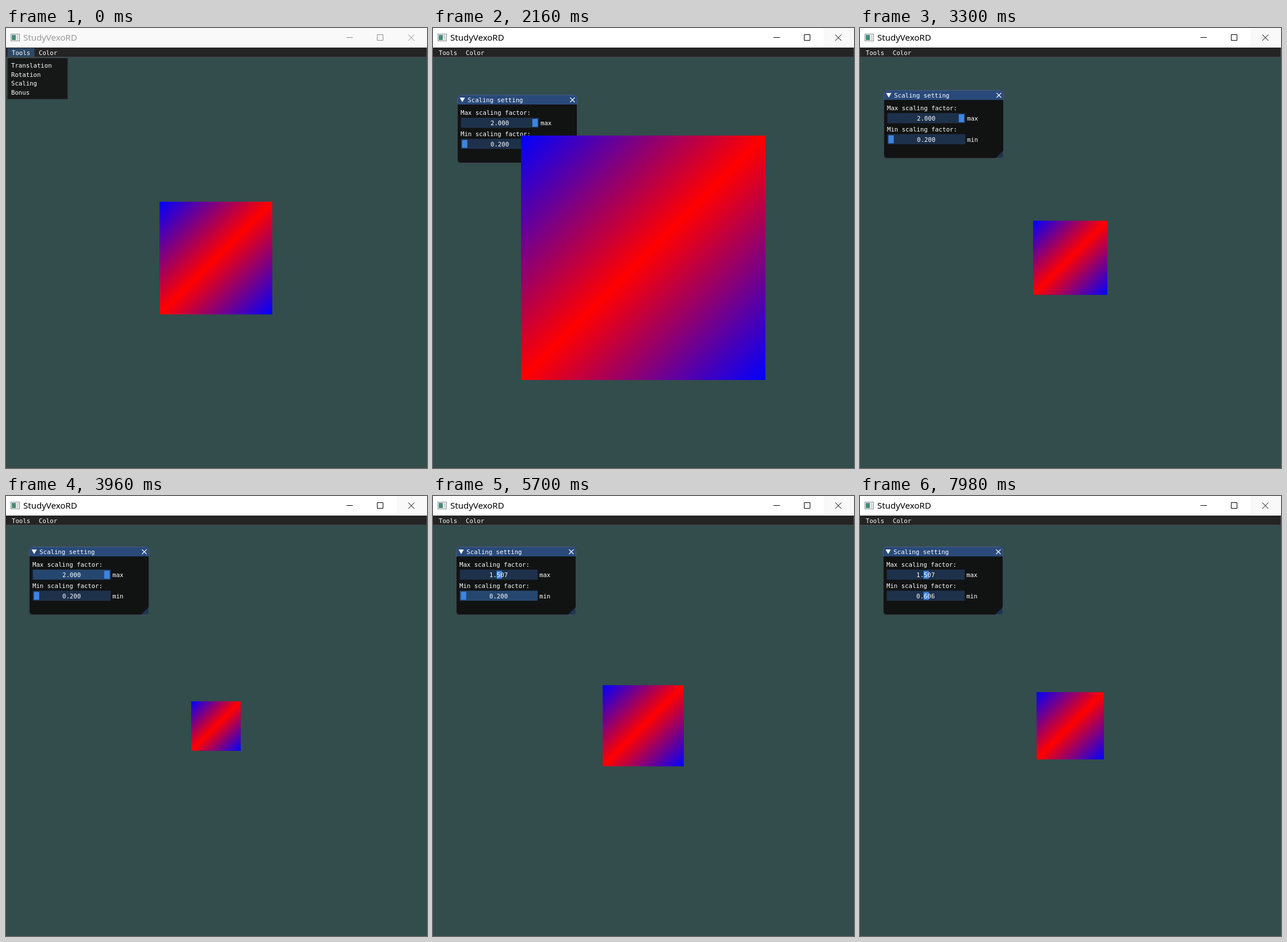
Animation, 732 px wide and 765 px high, one loop 8000 ms. Source, as an HTML page:

```html
<!DOCTYPE html>
<html lang="en">
<head>
<meta charset="utf-8">
<title>Scaling demo</title>
<style>
  html, body { margin: 0; width: 100%; height: 100%; overflow: hidden; background: #334c4c; }
  svg { display: block; width: 732px; height: 765px; }
  text { font: 10.67px "DejaVu Sans Mono", "Liberation Mono", monospace; fill: #fff; white-space: pre; }
  #caption { font: 15px "Noto Sans", "Open Sans", sans-serif; }
  .crisp { shape-rendering: crispEdges; }
  .edge { fill: none; stroke: #6e6e80; stroke-opacity: .5; }
</style>
</head>
<body>
<svg viewBox="0 0 732 765">
  <defs>
    <linearGradient id="blend" x1="0" y1="0" x2="1" y2="1">
      <stop offset="0" stop-color="#00f"/>
      <stop offset=".5" stop-color="#f00"/>
      <stop offset="1" stop-color="#00f"/>
    </linearGradient>
    <linearGradient id="pane" x1="0" y1="0" x2="1" y2="1">
      <stop offset="0" stop-color="#4a8a96"/>
      <stop offset="1" stop-color="#3f8a5c"/>
    </linearGradient>
    <clipPath id="rounded"><rect width="209" height="119" rx="6"/></clipPath>
  </defs>

  <rect width="732" height="765" fill="#334c4c"/>

  <!-- title bar -->
  <rect id="bar" width="732" height="34"/>
  <rect id="closeBg" x="679" width="53" height="33"/>
  <g class="crisp">
    <rect x="8" y="10" width="16" height="13" fill="#8a8f94"/>
    <rect x="9" y="11" width="14" height="11" fill="#f4f6f6"/>
    <rect x="10" y="12" width="7" height="9" fill="url(#pane)"/>
    <rect x="18" y="12" width="4" height="9" fill="#d5dadc"/>
  </g>
  <text id="caption" x="30" y="22">StudyVexoRD</text>
  <g id="controls" fill="none">
    <path d="M592 16.5H603M645.5 11.5h10v10h-10z"/>
    <path id="closeX" d="M699.5 11.5l10.5 10.5M710 11.5l-10.5 10.5"/>
  </g>

  <!-- menu bar -->
  <rect y="34" width="732" height="17" fill="#242424"/>
  <path class="edge" d="M0 50.5H731.5V34"/>
  <rect id="toolsBg" x="2.5" y="35" width="47" height="15" fill="#2d4766"/>
  <text x="10" y="47">Tools</text>
  <text x="57" y="47">Color</text>

  <g id="menu">
    <rect x="2.5" y="52" width="105" height="72" fill="#161817"/>
    <rect class="edge" x="3" y="52.5" width="104" height="71" style="stroke-opacity:.2"/>
    <rect id="itemBg" x="6" y="89" width="98" height="15" fill="#397dcd"/>
    <text x="9" y="69">Translation</text>
    <text x="9" y="84.5">Rotation</text>
    <text x="9" y="100">Scaling</text>
    <text x="9" y="115.5">Bonus</text>
  </g>

  <!-- settings panel, drawn from its own top left corner -->
  <g id="panel">
    <g clip-path="url(#rounded)">
      <rect width="209" height="119" fill="#111313"/>
      <rect width="209" height="17" fill="#294a7a"/>
      <path d="M209 104.5V119H194z" fill="#1e344e"/>
    </g>
    <rect class="edge" x=".5" y=".5" width="208" height="118" rx="6"/>
    <path d="M4.5 5h9l-4.5 8z" fill="#fff"/>
    <path d="M196.5 5l8 8M204.500 5l-8 8" stroke="#fff" stroke-width="1.1"/>
    <text x="18.300" y="13">Scaling setting</text>
    <text x="6" y="35">Max scaling factor:</text>
    <text x="6" y="71.500">Min scaling factor:</text>
    <g id="maxRow" transform="translate(6.500 40)"></g>
    <g id="minRow" transform="translate(6.500 76.600)"></g>
  </g>

  <rect id="square" class="crisp" fill="url(#blend)"/>
</svg>

<script>
const LOOP = 8000, STEP = 60;
const $ = id => document.getElementById(id);

// [time, value] points, joined by straight lines
const SIZE = [
  [0, 196], [1365, 196], [2100, 405], [2160, 425], [2220, 441], [2760, 284],
  [2940, 233], [3695, 15], [3960, 86], [4620, 261], [4920, 352], [5460, 205],
  [5700, 141], [6163, 16], [6960, 233], [7140, 288], [7200, 311], [7980, 117]
];
const MAX = [[4200, 2], [4620, 1.68], [5040, 1.507]];
const MIN = [[6180, .2], [6300, .299], [6960, .57], [7200, .606]];
const PANEL_X = [[3180, 42], [3600, 40]];
const PANEL_Y = [[3180, 116], [3600, 88]];

// [time, state] points, held until the next one
const MAX_STATE = [[0, "idle"], [2460, "hover"], [3060, "idle"], [3780, "hover"],
  [4140, "active"], [5520, "hover"], [5580, "idle"]];
const MIN_STATE = [[0, "idle"], [5640, "hover"], [6120, "active"], [7380, "hover"], [7620, "idle"]];

const FRAME = { idle: "#1e314b", hover: "#25476f", active: "#326bae" };

function lerp(points, t) {
  const i = points.findIndex(p => p[0] > t);
  if (i === 0) return points[0][1];
  if (i < 0) return points[points.length - 1][1];
  const [t0, a] = points[i - 1], [t1, b] = points[i];
  return a + (b - a) * (t - t0) / (t1 - t0);
}

const held = (points, t) => points.filter(p => p[0] <= t).pop()[1];

function set(el, attrs) {
  for (const key in attrs) el.setAttribute(key, attrs[key]);
}

const show = (el, on) => set(el, { visibility: on ? "visible" : "hidden" });

function makeSlider(row, label, low, high) {
  row.innerHTML =
    '<rect width="135.5" height="17.5"/><rect y="2" width="9.3" height="13.800"/>' +
    '<text x="51.5" y="13"></text><text x="138.5" y="13">' + label + '</text>';
  const [frame, grab, value] = row.children;
  return (v, state) => {
    set(frame, { fill: FRAME[state] });
    set(grab, {
      x: 1.9 + 122.4 * (v - low) / (high - low),
      fill: state === "active" ? "#4296fa" : "#3d85e0"
    });
    value.textContent = v.toFixed(3);
  };
}

const drawMax = makeSlider($("maxRow"), "max", 1, 2);
const drawMin = makeSlider($("minRow"), "min", .2, 1);

function draw(t) {
  const focused = t >= 1320, started = t >= 1380;
  const closing = t >= 360 && t < 420;

  set($("bar"), { fill: focused ? "#fff" : "#f9f9f9" });
  set($("closeBg"), { fill: closing ? "#f1707a" : "#f9f9f9" });
  $("caption").style.fill = focused ? "#000" : "#999";
  set($("controls"), { stroke: focused ? "#000" : "#8c8c8c" });
  set($("closeX"), { stroke: closing ? "#fff" : focused ? "#000" : "#8c8c8c" });

  show($("menu"), !started);
  show($("toolsBg"), !started);
  show($("itemBg"), focused && !started);

  show($("panel"), started);
  const x = Math.round(lerp(PANEL_X, t)), y = Math.round(lerp(PANEL_Y, t));
  set($("panel"), { transform: `translate(${x} ${y})` });
  drawMax(lerp(MAX, t), held(MAX_STATE, t));
  drawMin(lerp(MIN, t), held(MIN_STATE, t));

  const size = Math.round(lerp(SIZE, t));
  set($("square"), {
    x: Math.round(365.4 - size / 2), y: Math.round(399.9 - size / 2),
    width: size, height: size
  });
}

const start = performance.now();
function tick() {
  const t = (performance.now() - start) % LOOP;
  draw(Math.floor(t / STEP) * STEP);
  requestAnimationFrame(tick);
}
tick();
</script>
</body>
</html>
```
